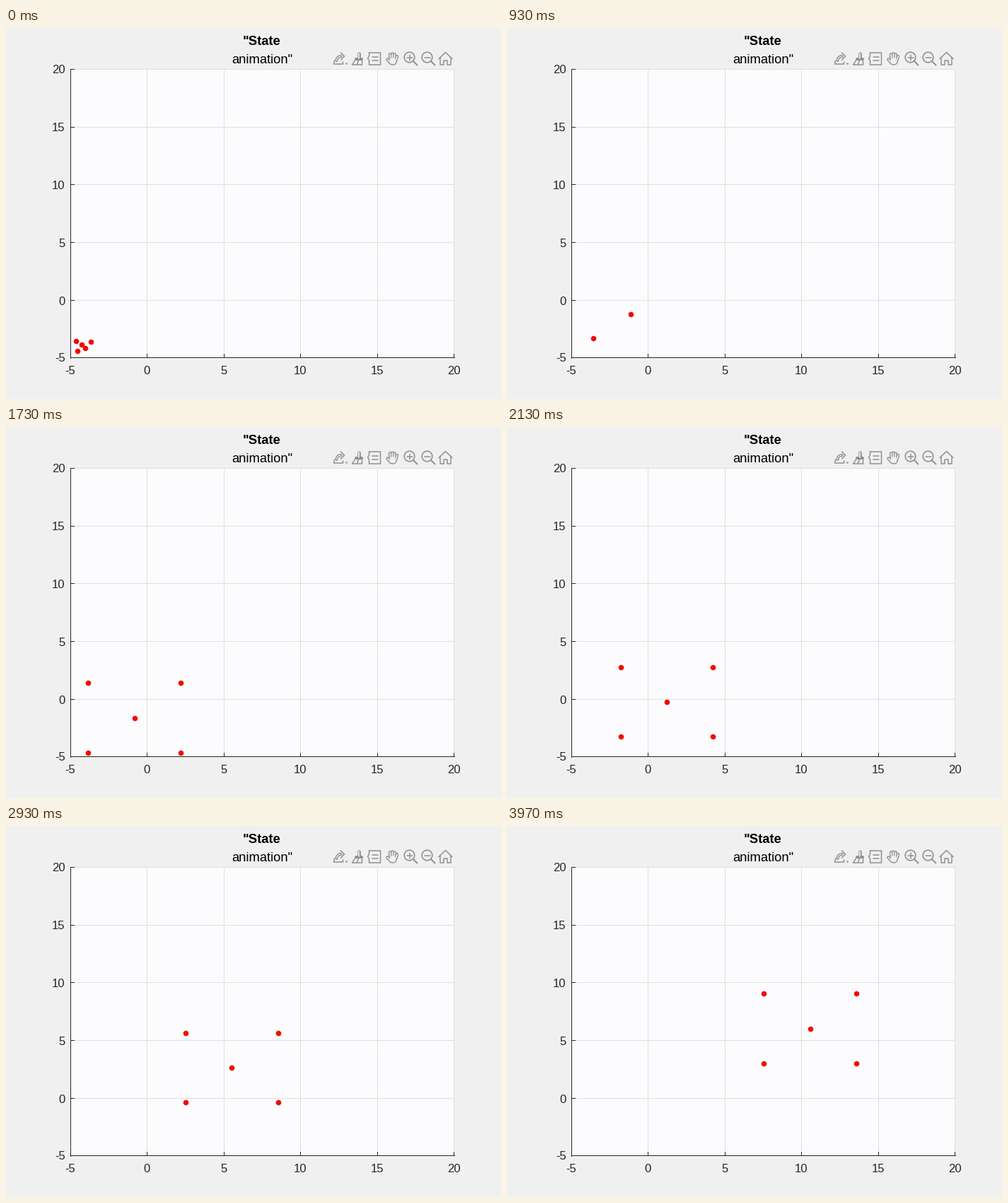
A matplotlib script for the animation above (4.01 s loop, 700 by 525 pixels).

```python
import numpy as np
import matplotlib.pyplot as plt
from matplotlib.animation import FuncAnimation
from matplotlib.patches import Circle, Rectangle

W, H, DPI = 700, 525, 100
FRAMES, LOOP = 120, 4010
LEFT, RIGHT, TOP, BOTTOM = 91, 633, 58, 466
STEP_X, STEP_Y = 108.5, 81.7  # pixels per five units

BACK, PLOT = "#f0f0f0", "#fcfcff"
INK, GRID, ICON, RED = "#262626", "#dfdfdf", "#8f8f8f", "#f20a00"


def pt(px):
    return px * 72 / DPI


fig = plt.figure(figsize=(W / DPI, H / DPI), dpi=DPI, facecolor=BACK)
# Data coordinates are pixels counted from the top left corner.
ax = fig.add_axes([0, 0, 1, 1])
ax.set_xlim(0, W)
ax.set_ylim(H, 0)
ax.axis("off")


def line(xs, ys, color, z=2):
    ax.plot(xs, ys, color=color, lw=pt(1), antialiased=False,
            solid_capstyle="butt", zorder=z)


def label(x, y, s, px, ha="center", color="black", weight="normal"):
    ax.text(x, y, s, fontsize=pt(px), ha=ha, va="baseline", color=color,
            weight=weight, family="Liberation Sans")


def stroke(*points, width=1.5, color=ICON, z=2):
    ax.plot(*zip(*points), color=color, lw=pt(width), zorder=z,
            solid_joinstyle="round", solid_capstyle="round")


def tube(*points, width=4.6):
    """Rounded hollow stroke; overlapping tubes merge into one outline."""
    stroke(*points, width=width)
    stroke(*points, width=width - 2.8, color=BACK, z=3)


def draw_axes():
    ax.add_patch(Rectangle((LEFT, TOP), RIGHT - LEFT, BOTTOM - TOP,
                           color=PLOT, lw=0, zorder=1))
    for i in range(6):
        value = str(5 * i - 5)
        x = int(LEFT + STEP_X * i)
        y = round(BOTTOM + 0.4 - STEP_Y * i)
        line([x, x], [TOP, BOTTOM], GRID)
        line([LEFT, RIGHT], [y, y], GRID)
        line([x, x], [BOTTOM - 5, BOTTOM], INK, 3)
        line([LEFT, LEFT + 5], [y, y], INK, 3)
        label(x, 490.5, value, 16.67, color=INK)
        label(83.5, y + 6.5, value, 16.67, ha="right", color=INK)
    line([LEFT, LEFT], [TOP, BOTTOM + 1], INK, 3)
    line([LEFT, RIGHT + 1], [BOTTOM, BOTTOM], INK, 3)
    label(362, 23.5, '"State', 18.33, weight="bold")
    label(362, 49.5, 'animation"', 18.33)


def export_icon(x, y):
    stroke((x - 7, y + 3), (x - 8, y + 8), (x + 5, y + 8), (x + 5, y + 5))
    a = np.linspace(np.pi, 1.5 * np.pi, 12)
    tube(*zip(x + 2 + 6 * np.cos(a), y + 3 + 6 * np.sin(a)), width=4)
    stroke((x + 2, y - 8), (x + 7, y - 3), (x + 2, y + 2))
    ax.plot(x + 9, y + 7, marker=(3, 0, -45), ms=pt(4), color=ICON, mew=0)


def brush_icon(x, y):
    tube((x + 2, y - 7), (x + 2, y))
    stroke((x - 2, y + 1), (x + 6, y + 1), width=4)
    stroke((x - 3, y + 3), (x - 7, y + 9), (x + 7, y + 9), (x + 7, y + 3))
    stroke((x, y + 8), (x + 2, y + 3))


def tip_icon(x, y):
    stroke((x - 8, y - 8), (x + 8, y - 8), (x + 8, y + 9), (x - 8, y + 9),
           (x - 8, y + 3), (x - 10, y), (x - 8, y - 3), (x - 8, y - 8))
    for dy in (-2, 3):
        stroke((x - 4, y + dy), (x + 4, y + dy))


def hand_icon(x, y):
    for i in range(4):
        dx = 3.3 * i - 3.5
        tube((x + dx, y - 6.5 + 0.9 * (i - 1) ** 2), (x + 0.8 * dx, y + 2))
    tube((x - 7, y + 1.5), (x - 2, y + 7))
    tube((x + 0.5, y + 3.5), (x + 0.7, y + 4), width=11.5)


def zoom_icon(x, y, plus=False):
    x, y = x - 1, y - 1.5
    ax.add_patch(Circle((x, y), 7.3, fill=False, ec=ICON, lw=pt(1.6)))
    stroke((x + 5.3, y + 5.3), (x + 11, y + 11), width=2)
    stroke((x - 4, y), (x + 4, y))
    if plus:
        stroke((x, y - 4), (x, y + 4))


def zoom_in_icon(x, y):
    zoom_icon(x, y, plus=True)


def home_icon(x, y):
    stroke((x - 9.5, y + 0.5), (x, y - 8.5), (x + 9.5, y + 0.5))
    for s in (-1, 1):
        stroke((x + 7.5 * s, y - 1), (x + 7.5 * s, y + 9), (x + 2.5 * s, y + 9),
               (x + 2.5 * s, y + 3), (x, y + 3))


def draw_toolbar():
    icons = (export_icon, brush_icon, tip_icon, hand_icon,
             zoom_in_icon, zoom_icon, home_icon)
    for i, icon in enumerate(icons):
        icon(471.5 + 25 * i, 43)


def smooth_path(keys, points, t):
    """Cubic Hermite path through a few key positions."""
    k, p = np.array(keys, float), np.array(points, float)
    m = np.gradient(p, k, axis=0)
    i = np.clip(np.searchsorted(k, t, side="right") - 1, 0, len(k) - 2)
    h = (k[i + 1] - k[i])[:, None]
    s = (t - k[i])[:, None] / h
    return ((1 + 2 * s) * (1 - s) ** 2 * p[i] + s * (1 - s) ** 2 * h * m[i]
            + s ** 2 * (3 - 2 * s) * p[i + 1] - s ** 2 * (1 - s) * h * m[i + 1])


t = np.arange(FRAMES)
SETTLE = 41  # steps until the square formation is reached
center = smooth_path(
    [0, 12, 27, 51, 75, 99, 118],
    [(107, 447.5), (105.5, 441.5), (121.5, 438.5), (181.5, 411.5),
     (274, 364.5), (363.5, 319.5), (428.5, 286.5)], t)


def follower(side, start, kick):
    """Eases from its start offset to a corner, with an initial velocity."""
    s = np.minimum(t / SETTLE, 1)[:, None]
    end = np.multiply(side, (0.6 * STEP_X, 0.6 * STEP_Y))
    ease = s * s * (3 - 2 * s)
    push = SETTLE * s * (1 - s) ** 2
    return center + start + ease * (end - start) + push * np.array(kick)


agents = np.stack([
    center,
    follower((-1, -1), (-8.5, -4.5), (0, 0)),
    follower((1, -1), (13, -3.5), (0.8, 1.1)),
    follower((1, 1), (5, 5.5), (3, -0.2)),
    follower((-1, 1), (-6, 9), (1.1, 0)),
], axis=1)

draw_axes()
draw_toolbar()
dots, = ax.plot([], [], "o", ms=pt(7.6), color=RED, mew=0, zorder=5)


def update(n):
    x, y = agents[n].T
    inside = (x >= LEFT) & (x <= RIGHT) & (y >= TOP) & (y <= BOTTOM + 0.5)
    dots.set_data(x[inside], y[inside])
    return dots,


anim = FuncAnimation(fig, update, frames=FRAMES, interval=LOOP / FRAMES,
                     repeat=True, repeat_delay=0)
plt.show()
```
